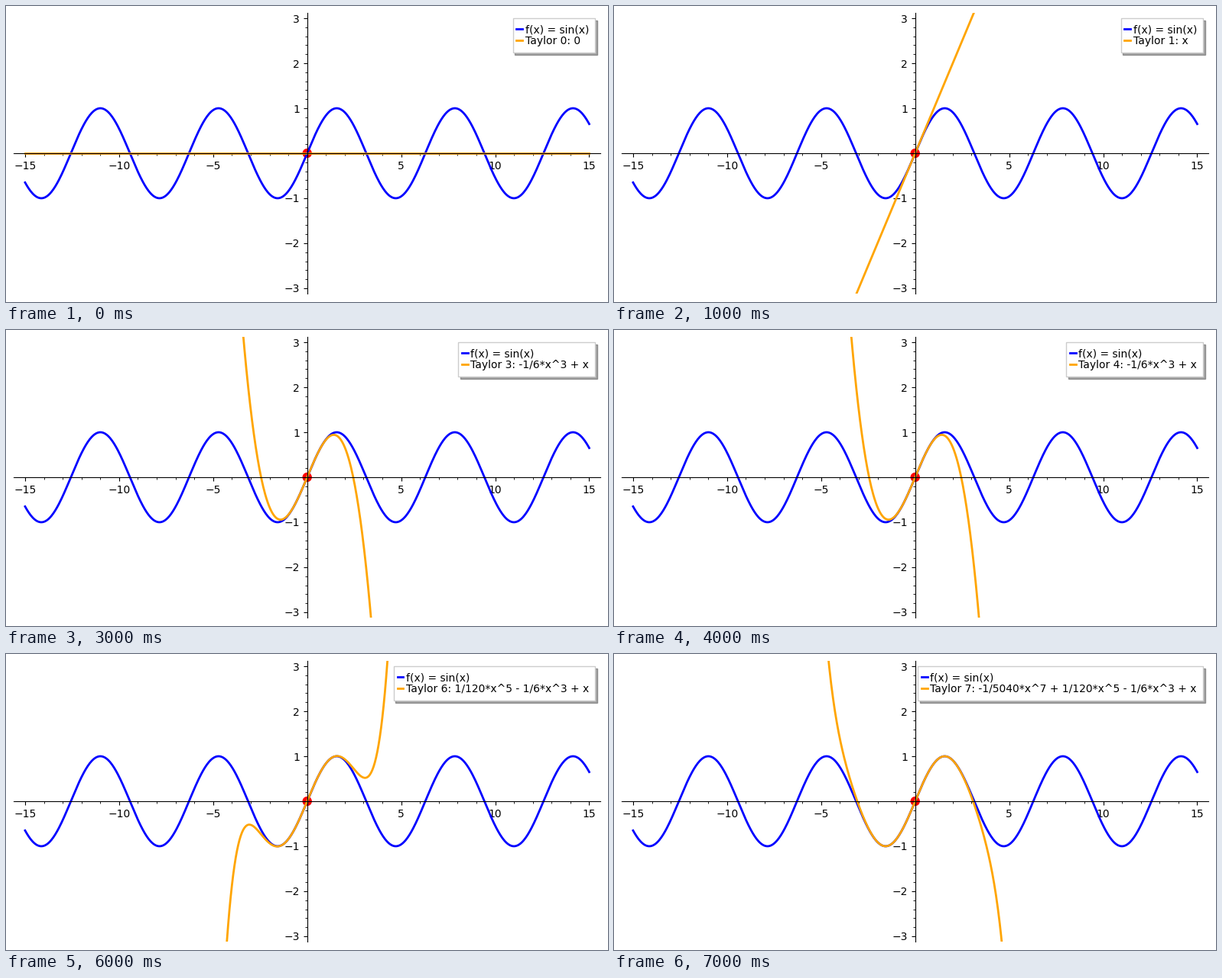
A matplotlib script for the animation above (8 s loop, 787x388 px).

```python
import math

import numpy as np
import matplotlib.pyplot as plt
from matplotlib.animation import FuncAnimation
from matplotlib.ticker import MultipleLocator

WIDTH, HEIGHT, DPI = 787, 388, 100
LEFT, RIGHT, BOTTOM, TOP = 10.2, 777.2, 11, 379
X_MAX, Y_MAX, PAD = 15, 3, 1.04
ORDERS = 8

plt.rcParams["font.family"] = "DejaVu Sans"
plt.rcParams["font.size"] = 10


def terms(order):
    """Odd powers of the sine series up to the order, with their signs."""
    return [(k, (-1) ** (k // 2)) for k in range(1, order + 1, 2)]


def polynomial(order, x):
    return sum((s * x**k / math.factorial(k) for k, s in terms(order)),
               np.zeros_like(x))


def formula(order):
    """The polynomial as text, highest power first."""
    text = ""
    for k, sign in reversed(terms(order)):
        body = "x" if k == 1 else f"1/{math.factorial(k)}*x^{k}"
        if text:
            text += (" + " if sign > 0 else " - ") + body
        else:
            text = body if sign > 0 else "-" + body
    return text or "0"


def tick_label(value, _):
    return "" if abs(value) < 1e-9 else f"{value:.0f}".replace("-", "\u2212")


def style_axis(axis, major, minor):
    axis.set_major_locator(MultipleLocator(major))
    axis.set_minor_locator(MultipleLocator(minor))
    axis.set_major_formatter(tick_label)


fig = plt.figure(figsize=(WIDTH / DPI, HEIGHT / DPI), dpi=DPI,
                 facecolor="white")
ax = fig.add_axes([LEFT / WIDTH, BOTTOM / HEIGHT,
                   (RIGHT - LEFT) / WIDTH, (TOP - BOTTOM) / HEIGHT])
ax.set_xlim(-X_MAX * PAD, X_MAX * PAD)
ax.set_ylim(-Y_MAX * PAD, Y_MAX * PAD)

for side in ("left", "bottom"):
    ax.spines[side].set_position("zero")
for side in ("right", "top"):
    ax.spines[side].set_visible(False)
style_axis(ax.xaxis, 5, 1)
style_axis(ax.yaxis, 1, 0.2)

xs = np.linspace(-X_MAX, X_MAX, 901)
ax.scatter([0], [0], s=80, color="red", edgecolors="none", zorder=0)
ax.plot(xs, np.sin(xs), color="blue", lw=2, label="f(x) = sin(x)")
approx, = ax.plot(xs, 0 * xs, color="orange", lw=2)


def draw(order):
    approx.set_ydata(polynomial(order, xs))
    approx.set_label(f"Taylor {order}: {formula(order)}")
    ax.legend(loc="upper right", numpoints=2, handlelength=0.05,
              handletextpad=0.5, borderpad=0.6, labelspacing=0.02,
              shadow=True, fancybox=False, framealpha=1,
              facecolor="white", edgecolor="0.8")
    return []


anim = FuncAnimation(fig, draw, frames=ORDERS, interval=1000,
                     init_func=lambda: draw(0), repeat=True, repeat_delay=0)
plt.show()
```
